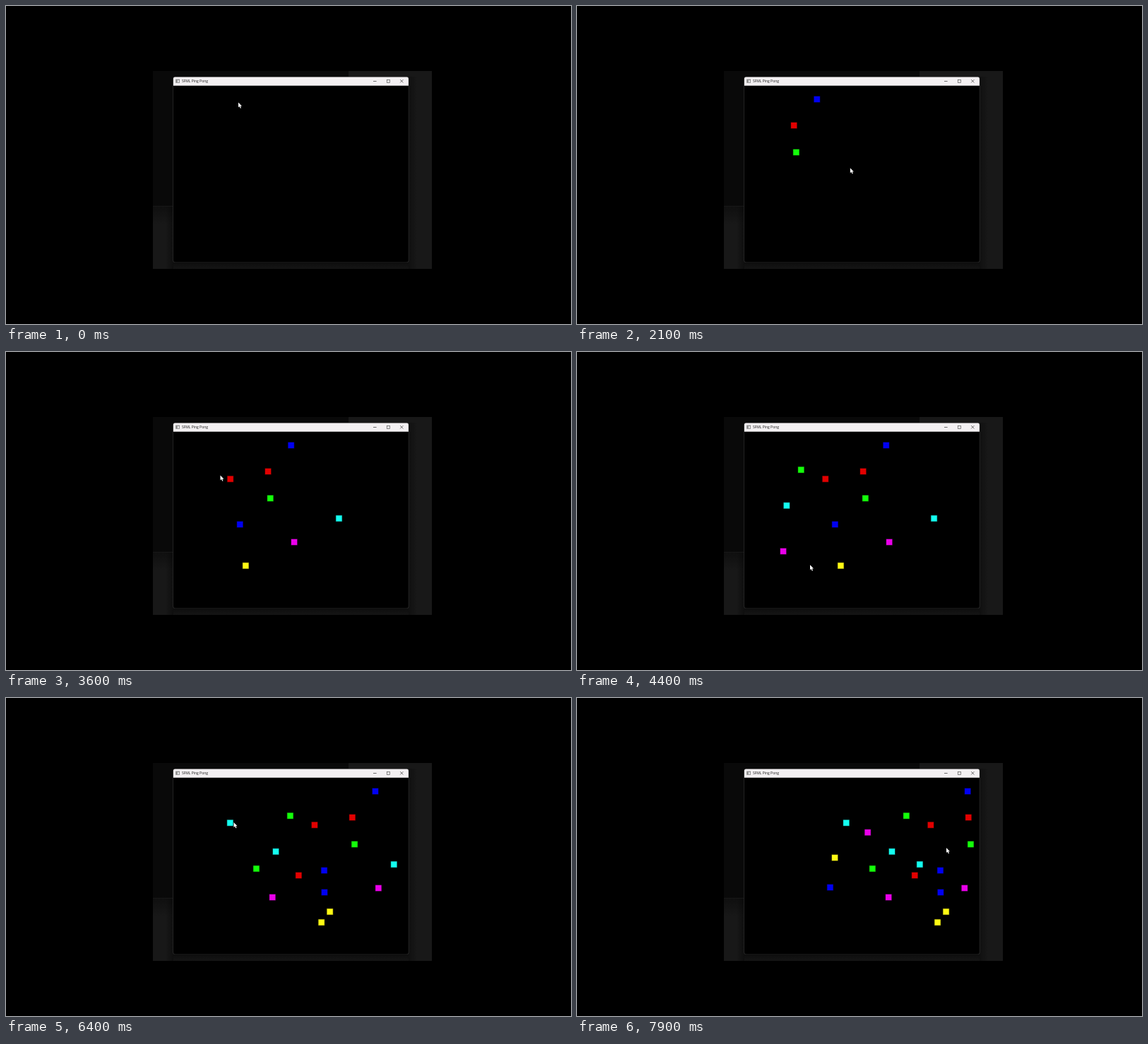
Recreate the animation shown at these times as an HTML page with a canvas. Size 800 by 450 pixels, loop 8 s.

```html
<!DOCTYPE html>
<html lang="en">
<head>
<meta charset="utf-8">
<title>SFML Ping Pong</title>
<style>
html, body { margin: 0; width: 100%; height: 100%; overflow: hidden; background: #000; }
canvas { display: block; }
</style>
</head>
<body>
<canvas id="stage" width="800" height="450"></canvas>
<script>
const ctx = document.getElementById('stage').getContext('2d');
const LOOP = 8000, STEP = 100, SPEED = 0.0426, WALL = 570;
const COLORS = ['#0000f2', '#e20000', '#14ff0a', '#14fff0', '#ea00ea', '#fffa14'];

// Where each square's track would start at time 0: [x, y]
const tracks = [
  [250.3, 132], [217.7, 169], [220.9, 207], [318.1, 235.5], [254.7, 269], [186, 302.4],
  [177.9, 244], [164.3, 179.7], [129.8, 166.7], [109.4, 217.3], [104.6, 282], [174, 317.5],
  [178.3, 275], [141.7, 251], [81.8, 241.5], [44.7, 176.7], [75.1, 190.2], [28.5, 226],
  [21.9, 268]
];

// Clicks come in a slowly changing rhythm; each drops a square at the pointer
const clickTime = i => 900 + 352 * i + 280 * Math.sin(0.38 * i);
const clicks = tracks.map(([x, y], i) => [clickTime(i), x + SPEED * clickTime(i), y]);
const rests = [[200, 329, 136.5], [5500, 349.3, 245.7], [6400, 322.5, 176], [7900, 523, 212]];
const path = [...clicks, ...rests].sort((a, b) => a[0] - b[0]);

function rect(x, y, w, h, fill) {
  ctx.fillStyle = fill;
  ctx.fillRect(x, y, w, h);
}

function panel(x, y, w, h, radius, fill) {
  ctx.beginPath();
  ctx.roundRect(x, y, w, h, radius);
  ctx.fillStyle = fill;
  ctx.fill();
}

function fade(x0, y0, x1, y1, from, to) {
  const g = ctx.createLinearGradient(x0, y0, x1, y1);
  g.addColorStop(0, from);
  g.addColorStop(1, to);
  return g;
}

function line(x0, y0, x1, y1, color) {
  ctx.strokeStyle = color;
  ctx.lineWidth = 0.7;
  ctx.beginPath();
  ctx.moveTo(x0, y0);
  ctx.lineTo(x1, y1);
  ctx.stroke();
}

function drawDesktop() {
  rect(0, 0, 800, 450, '#000');
  rect(208, 92, 395, 280, '#181818');
  rect(208, 283, 30, 26, fade(0, 283, 0, 309, '#0f0f0f', '#181818'));
  rect(208, 92, 277, 191, '#090909');
  line(208, 283.3, 237, 283.3, '#1e1e1e');
  rect(570, 100, 12, 272, fade(570, 0, 582, 0, '#101010', '#181818'));
  rect(226, 284, 11, 88, fade(237, 0, 226, 0, 'rgba(8,8,8,.6)', 'rgba(8,8,8,0)'));
  rect(237, 362, 333, 10, fade(0, 362, 0, 372, '#0d0d0d', '#151515'));
}

function drawWindow() {
  panel(236.2, 100, 334.4, 263.1, 3, '#2a2a2a');
  panel(237, 100.6, 332.8, 261.8, 3, '#000');
  panel(236.9, 100.5, 333, 12.2, [2.5, 2.5, 0, 0], '#f3f0f2');

  rect(240.3, 103.6, 5.6, 5.2, '#777');
  rect(241, 104.6, 4.2, 3.6, '#e4e4e4');
  rect(241, 104.6, 1.7, 3.6, '#8a8a8a');

  ctx.font = '5px "Open Sans", sans-serif';
  ctx.fillStyle = '#181818';
  ctx.fillText('SFML Ping Pong', 249, 108.3);

  line(520, 106.5, 524.6, 106.5, '#333');
  line(558.2, 104.2, 562.4, 108.4, '#333');
  line(562.4, 104.2, 558.2, 108.4, '#333');
  ctx.strokeStyle = '#555';
  ctx.strokeRect(539.3, 104.4, 4, 4);
}

function drawSquares(t) {
  ctx.save();
  ctx.beginPath();
  ctx.rect(237, 113, WALL - 237, 249);
  ctx.clip();
  tracks.forEach(([x0, y], i) => {
    if (t < clickTime(i)) return;
    const x = WALL - Math.abs(WALL - x0 - SPEED * t);
    const color = COLORS[i % COLORS.length];
    ctx.globalAlpha = 0.3;
    rect(x - 4.7, y - 4.7, 9.4, 9.4, color);
    ctx.globalAlpha = 1;
    rect(x - 4.1, y - 4.1, 8.2, 8.2, color);
  });
  ctx.restore();
}

function pointerAt(t) {
  t = Math.max(t, path[0][0]);
  const next = path.findIndex(p => p[0] >= t && p !== path[0]);
  const [t0, x0, y0] = path[next - 1], [t1, x1, y1] = path[next];
  const u = (t - t0) / (t1 - t0);
  const eased = (u + u * u * (3 - 2 * u)) / 2;
  return [x0 + (x1 - x0) * eased, y0 + (y1 - y0) * eased];
}

const arrow = new Path2D('M0 0V7L1.6 5.6 2.8 8.3 4 7.8 2.8 5.2H5Z');

function drawPointer(t) {
  ctx.save();
  ctx.translate(...pointerAt(t));
  ctx.strokeStyle = '#000';
  ctx.lineWidth = 0.8;
  ctx.stroke(arrow);
  ctx.fillStyle = '#fff';
  ctx.fill(arrow);
  ctx.restore();
}

let start;
function tick(now) {
  start ??= now;
  const t = Math.floor(((now - start) % LOOP) / STEP) * STEP;
  drawDesktop();
  drawWindow();
  drawSquares(t);
  drawPointer(t);
  requestAnimationFrame(tick);
}
requestAnimationFrame(tick);
</script>
</body>
</html>
```
